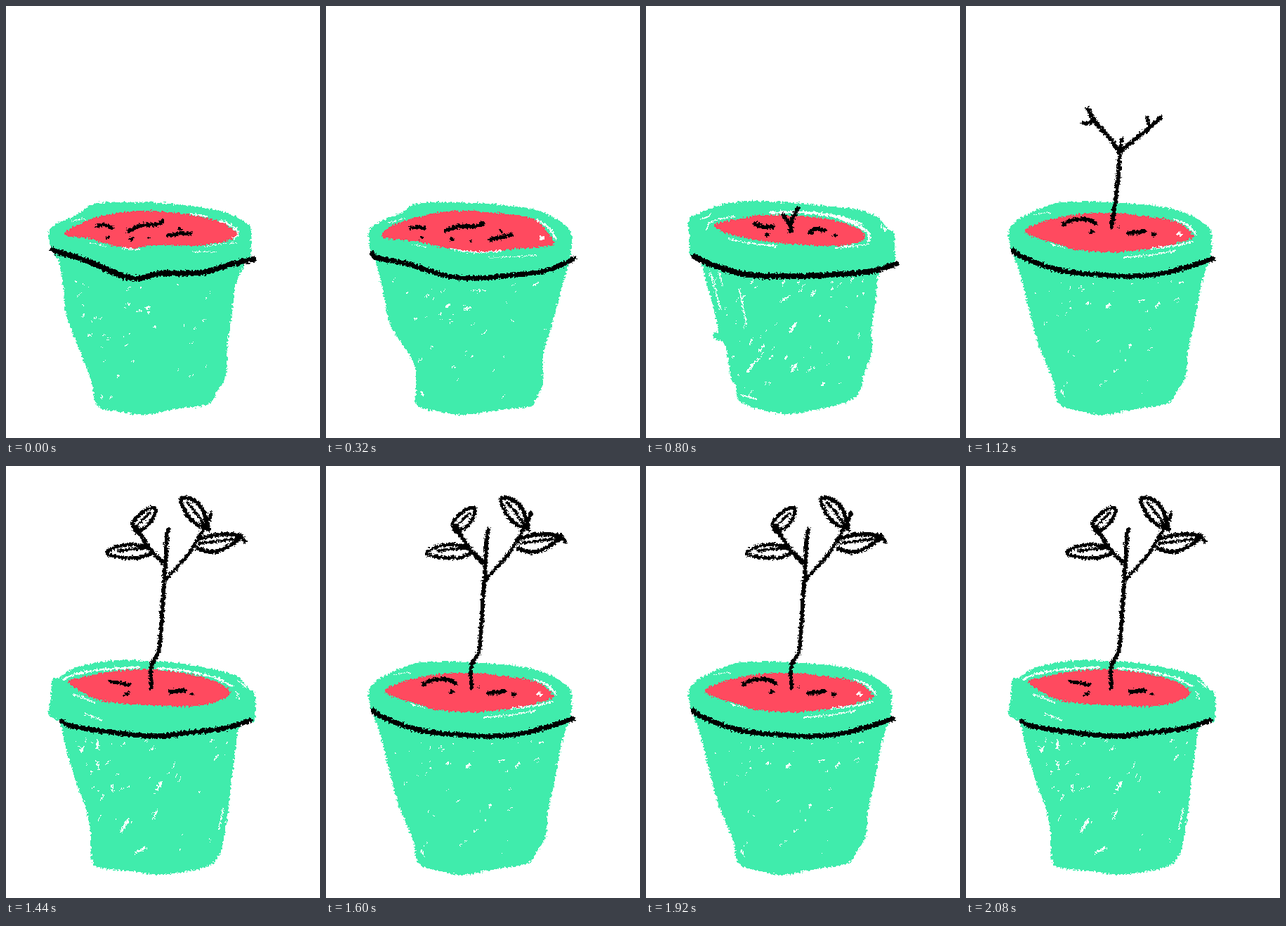
Animation, 447 px wide and 614 px high, one loop 2.24 s. Source, as an HTML page:

```html
<!DOCTYPE html>
<html lang="en">
<head>
<meta charset="utf-8">
<title>Growing plant</title>
<style>
html, body { margin: 0; width: 100%; height: 100%; overflow: hidden; background: #fff; }
svg { display: block; width: 447px; height: 614px; }
.cel { visibility: hidden; animation: show 2240ms step-end infinite; }
.line { fill: none; stroke: #000; stroke-linecap: round; stroke-linejoin: round; }
.gap { fill: none; stroke: #fff; stroke-linecap: round; stroke-linejoin: round; }
.pot { fill: #40ecac; }
.soil { fill: #ff4a5f; }
@keyframes show {
  0% { visibility: visible; }
  7.142857%, 100% { visibility: hidden; }
}
</style>
</head>
<body>
<svg id="stage" viewBox="0 0 447 614" shape-rendering="crispEdges"></svg>
<script>
const STEP = 160, COUNT = 14;

// Each stroke is "width: x,y x,y ..."
const pots = {
  wavy: {
    outer: '62,318 75,308 98,298 122,283 150,279 200,279 245,282 290,288 315,294 337,305 348,315 349,335 348,357 341,364 331,385 325,405 322,435 316,475 313,525 300,548 288,566 240,573 200,581 170,578 131,569 122,535 105,490 90,452 84,430 82,400 76,365 66,349 62,335',
    soil: '84,322 100,312 130,300 175,292 225,292 270,298 305,307 328,321 326,329 310,335 270,341 222,340 180,344 150,340 120,331 90,327',
    band: '8: 67,346 75,350 100,357 120,364 145,375 170,385 190,387 220,380 255,380 285,378 320,367 352,360',
    gaps: ['2: 262,295 285,299', '3: 304,305 322,313 331,323 324,331', '1: 282,342 308,338 330,337', '1: 265,350 300,349', '1: 92,306 112,302', '1: 118,336 142,342', '2: 166,344 190,346', '4: 201,429 203,428', '3: 173,424 176,423', '3: 136,552 137,557'],
    marks: ['5: 129,313 140,311 151,316', '6: 174,320 192,312 214,311 222,306', '5: 231,326 245,324 264,323', '4: 144,329 145,329', '5: 178,331 180,331', '3: 203,329 203,330', '4: 246,316 248,317'],
    flecks: { seed: 7, n: 38, len: 7, angle: -.6 }
  },
  waisted: {
    outer: '62,318 85,303 108,294 125,282 160,279 210,280 260,284 300,290 325,301 348,321 348,357 340,385 330,420 320,460 309,495 309,535 298,560 290,569 240,575 195,581 160,576 130,568 128,545 127,515 115,490 95,460 88,440 82,410 75,380 70,360 63,345',
    soil: '81,323 95,312 130,300 180,291 230,293 285,299 305,309 324,335 318,341 270,345 210,350 165,343 130,335 85,330',
    band: '7: 66,351 72,358 110,365 140,374 175,384 215,387 260,383 305,378 335,368 353,359',
    gaps: ['3: 300,304 317,315 328,332', '5: 306,329 310,329', '2: 178,345 212,350 250,348', '1: 230,358 270,356 302,354', '1: 88,309 112,301', '1: 122,339 145,343', '3: 197,431 205,429', '3: 171,427 174,425', '3: 136,549 138,553', '1: 205,405 228,403'],
    marks: ['5: 119,316 130,314 141,316', '6: 171,319 190,313 212,313 223,309', '6: 234,332 248,329 264,325', '4: 135,329 137,329', '5: 178,331 180,332', '3: 205,334 206,335', '4: 248,319 250,321'],
    flecks: { seed: 19, n: 40, len: 8, angle: -.6 }
  },
  round: {
    outer: '62,315 85,298 125,281 170,278 220,280 270,284 310,293 340,310 349,322 349,357 341,375 332,410 325,450 316,490 313,525 300,548 286,565 240,573 195,581 160,575 132,565 124,530 108,495 97,460 88,425 78,385 70,360 63,342',
    soil: '84,319 105,308 150,297 200,294 250,298 300,307 323,326 315,333 270,344 215,350 160,347 130,338 95,328',
    band: '7: 67,347 75,354 105,367 140,377 190,382 240,384 290,378 352,359',
    gaps: ['3: 296,303 316,312 327,325', '5: 303,324 306,325', '2: 226,357 262,354 298,348', '2: 262,345 300,340 322,335', '1: 96,297 120,293', '1: 118,337 140,344', '4: 200,428 205,425', '3: 172,423 175,421', '3: 136,546 138,552'],
    marks: ['6: 139,310 155,304 175,304 184,309', '5: 178,322 180,321', '6: 232,323 255,320', '5: 266,324 269,324', '2: 218,315 218,315'],
    flecks: { seed: 31, n: 42, len: 8, angle: -.65 }
  },
  sketchy: {
    outer: '61,304 75,295 110,282 150,277 200,279 255,284 300,289 330,300 345,318 353,321 354,345 353,366 332,380 327,420 321,460 322,490 310,525 303,550 280,565 240,574 200,580 160,573 132,560 129,540 121,530 118,505 110,478 95,472 97,464 103,460 95,425 85,390 77,362 63,355 62,330',
    soil: '98,310 130,303 165,297 210,298 260,303 300,315 312,327 306,335 275,341 230,340 180,336 140,330 110,321',
    band: '8: 69,356 100,370 145,382 200,384 265,382 320,377 357,366',
    gaps: ['4: 178,294 215,293 260,297 295,309 316,322 317,334', '3: 232,294 275,299 308,310', '2: 86,318 94,306 125,299', '2: 78,304 92,297', '2: 118,331 145,337 185,341', '2: 270,344 315,339', '3: 335,312 341,319', '2: 91,378 98,400 106,432', '2: 104,378 109,396', '2: 133,402 143,452', '3: 236,411 241,404', '3: 205,464 214,450', '3: 145,520 154,506', '3: 208,519 214,509', '2: 136,553 158,559'],
    marks: ['6: 156,310 167,314 180,314', '6: 233,322 242,317 254,319', '5: 171,325 174,325', '4: 268,326 270,326'],
    flecks: { seed: 43, n: 58, len: 14, angle: -.9 }
  },
  lipped: {
    outer: '66,303 76,300 95,288 125,280 160,276 200,277 225,278 265,283 305,291 330,299 345,316 354,323 355,345 354,363 345,365 331,374 326,410 320,455 315,500 307,545 300,557 285,570 220,581 180,576 130,570 122,555 121,525 115,490 100,450 85,400 77,366 61,353 64,330',
    soil: '89,307 110,300 150,292 200,289 245,293 290,303 318,318 314,329 290,338 250,342 200,340 150,336 120,328',
    band: '7: 79,363 95,370 140,377 210,384 260,379 310,373 347,362',
    gaps: ['3: 80,304 102,295 140,289 190,286', '5: 206,276 208,284', '3: 214,287 260,292 300,302 322,313', '2: 330,305 341,314', '2: 328,320 331,330', '2: 96,324 125,336', '2: 112,352 136,361', '3: 130,390 131,402', '2: 129,420 133,432', '2: 151,452 152,463', '4: 215,460 221,450', '3: 209,502 215,490', '3: 164,520 174,502', '2: 303,516 309,488', '3: 186,549 198,543'],
    marks: ['5: 149,306 176,311', '5: 170,324 173,323', '6: 234,321 254,319', '4: 264,324 266,325'],
    flecks: { seed: 58, n: 46, len: 10, angle: -.95 }
  }
};

const plants = {
  none: [],
  sprout: ['6: 216,288 207,306 206,320', '6: 195,297 206,312'],
  shoot: ['6: 208,316 209,296 212,272', '6: 212,273 206,261 198,250', '6: 212,273 220,260 227,248'],
  twig: ['6: 219,210 217,240 213,275 207,314', '6: 218,208 205,188 185,166 173,146', '6: 167,166 186,165', '6: 218,208 240,190 262,172 277,158', '5: 258,158 261,172', '5: 218,208 222,188'],
  sapling: ['6: 207,316 209,280 217,240 221,195 225,150 228,115', '6: 224,160 205,138 188,112 182,92', '6: 225,176 248,152 268,122 284,82', '5: 203,134 182,130 164,134', '5: 268,122 288,114 305,116', '5: 182,94 190,86 198,82', '5: 280,96 268,85 262,82'],
  leafy: ['6: 207,315 207,284 217,265 221,230 224,180 227,140 229,100 231,90', '6: 226,140 205,118 190,95 186,88', '5: 226,163 245,142 262,122 275,100 287,80 292,66',
    '5: 183,92 181,80 195,65 211,59 211,70 200,86 185,94', '4: 185,86 194,77 205,67',
    '5: 206,119 185,112 160,114 143,124 165,130 190,130 207,124', '4: 160,121 180,118 203,117',
    '6: 288,90 280,62 264,47 249,48 258,69 270,82 288,90', '4: 258,52 270,66 281,82',
    '6: 276,103 292,99 315,97 334,101 312,117 292,122 273,117', '4: 275,110 300,107 330,103', '5: 333,98 340,107']
};

const cels = [
  ['wavy', 'none'], ['round', 'none'], ['waisted', 'none'], ['wavy', 'none'], ['round', 'none'],
  ['sketchy', 'sprout'], ['lipped', 'shoot'], ['round', 'twig'], ['sketchy', 'sapling'],
  ['lipped', 'leafy'], ['round', 'leafy'], ['lipped', 'leafy'], ['round', 'leafy'], ['lipped', 'leafy']
];

const parse = s => s.trim().split(' ').map(p => p.split(',').map(Number));

// Catmull-Rom curve through the points
function curve(text, closed) {
  const p = parse(text), n = p.length;
  const at = i => closed ? p[(i + n) % n] : p[Math.max(0, Math.min(n - 1, i))];
  const ctrl = (a, b, c) => [0, 1].map(k => (a[k] + (c[k] - b[k]) / 6).toFixed(1));
  let d = 'M' + p[0];
  for (let i = 0; i < (closed ? n : n - 1); i++) {
    const [a, b, c, e] = [at(i - 1), at(i), at(i + 1), at(i + 2)];
    d += `C${ctrl(b, a, c)} ${ctrl(c, e, b)} ${c}`;
  }
  return d + (closed ? 'Z' : '');
}

const shape = (text, cls) => `<path class="${cls}" d="${curve(text, true)}"/>`;
const stroke = (text, cls) => {
  const [w, pts] = text.split(':');
  return `<path class="${cls}" stroke-width="${w}" d="${curve(pts, false)}"/>`;
};
const strokes = (list, cls) => list.map(s => stroke(s, cls)).join('');

function random(seed) {
  return () => (seed = (seed * 16807) % 2147483647) / 2147483647;
}

// Bare paper showing between crayon strokes
function flecks({ seed, n, len, angle }) {
  const rnd = random(seed * 7919);
  let out = '';
  for (let i = 0; i < n; i++) {
    const t = rnd() ** 1.6, left = 92 + 45 * t, right = 322 - 32 * t;
    const x = left + (right - left) * rnd() ** 1.2, y = 392 + 168 * t;
    const l = 1 + len * rnd() ** 2, a = angle + (rnd() - .5) * .7;
    const w = 1 + (rnd() > .75 ? 1 : 0);
    out += stroke(`${w}: ${x},${y} ${x + l * Math.cos(a)},${y + l * Math.sin(a)}`, 'gap');
  }
  return out;
}

const rough = (id, seed) => `<filter id="${id}" filterUnits="userSpaceOnUse" x="0" y="0" width="447" height="614" color-interpolation-filters="sRGB">
  <feTurbulence type="fractalNoise" baseFrequency=".35" numOctaves="2" seed="${seed}"/>
  <feDisplacementMap in="SourceGraphic" scale="7" xChannelSelector="R" yChannelSelector="G"/></filter>`;

function cel([potName, plantName], i) {
  const pot = pots[potName], delay = (i - COUNT) * STEP;
  return `<g class="cel" style="animation-delay:${delay}ms"><g filter="url(#${potName})">`
    + shape(pot.outer, 'pot') + flecks(pot.flecks) + shape(pot.soil, 'soil')
    + strokes(pot.gaps, 'gap') + stroke(pot.band, 'line')
    + strokes(pot.marks, 'line') + strokes(plants[plantName], 'line') + '</g></g>';
}

document.getElementById('stage').innerHTML =
  '<defs>' + Object.keys(pots).map((id, i) => rough(id, i + 3)).join('') + '</defs>' + cels.map(cel).join('');
</script>
</body>
</html>
```
